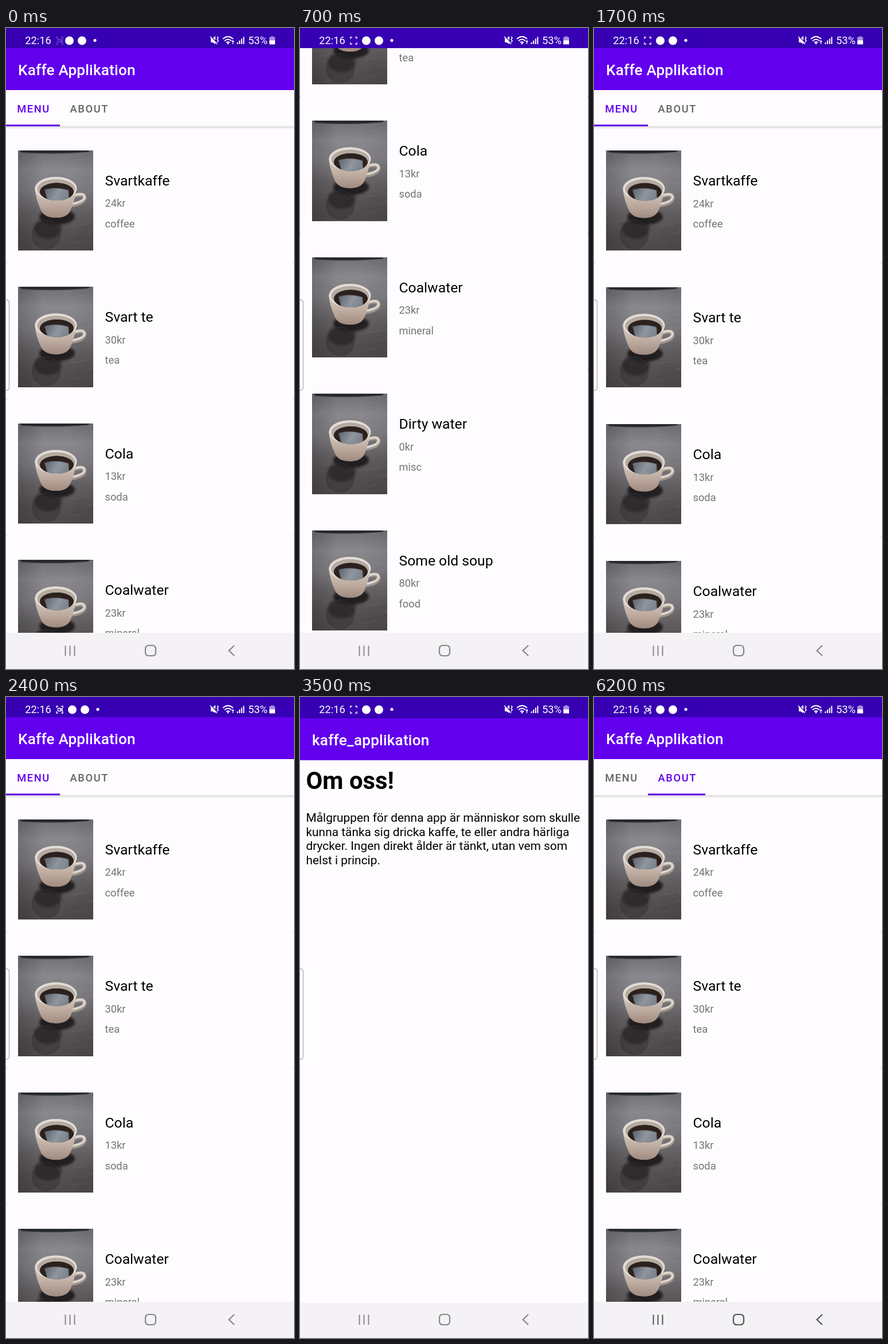
Recreate the animation shown at these times as an HTML page with a canvas. Size 502 by 1115 pixels, loop 6.4 s.

```html
<!DOCTYPE html>
<html lang="sv">
<head>
<meta charset="utf-8">
<style>
  html, body { margin: 0; width: 100%; height: 100%; overflow: hidden; background: #000; }
  canvas { display: block; width: 502px; height: 1115px; }
</style>
</head>
<body>
<canvas id="stage" width="502" height="1115"></canvas>
<script>
const W = 502, H = 1115, LOOP = 6400, STEP = 100;
const STATUS = 35, NAV = 1052, HEADER = 171, PITCH = 237.5;
const PURPLE = '#6200ee', DEEP = '#3700b3', PAPER = '#fefcff', NAV_BG = '#f4f2f5';
const MENU = [
  ['Svartkaffe', '24kr', 'coffee'],
  ['Svart te', '30kr', 'tea'],
  ['Cola', '13kr', 'soda'],
  ['Coalwater', '23kr', 'mineral'],
  ['Dirty water', '0kr', 'misc'],
  ['Some old soup', '80kr', 'food']
];
const ABOUT = [
  'Målgruppen för denna app är människor som skulle',
  'kunna tänka sig dricka kaffe, te eller andra härliga',
  'drycker. Ingen direkt ålder är tänkt, utan vem som',
  'helst i princip.'
];

const screen = document.getElementById('stage').getContext('2d');
const makeLayer = (w, h) => {
  const c = document.createElement('canvas');
  c.width = w;
  c.height = h;
  return c.getContext('2d');
};
const aboutLayer = makeLayer(W, H);

// Piecewise linear track: [time, value] pairs.
function track(t, ...keys) {
  if (t <= keys[0][0]) return keys[0][1];
  for (let i = 1; i < keys.length; i++) {
    const [t0, a] = keys[i - 1], [t1, b] = keys[i];
    if (t <= t1) return a + (b - a) * (t - t0) / (t1 - t0);
  }
  return keys[keys.length - 1][1];
}

function rect(g, color, x, y, w, h) {
  g.fillStyle = color;
  g.fillRect(x, y, w, h);
}

function ellipse(g, color, x, y, rx, ry, tilt = 0) {
  g.fillStyle = color;
  g.beginPath();
  g.ellipse(x, y, rx, ry, tilt, 0, 7);
  g.fill();
}

function text(g, str, x, y, size, color, weight = 400, spacing = 0) {
  g.font = `${weight} ${size}px Roboto, sans-serif`;
  g.letterSpacing = spacing + 'px';
  g.fillStyle = color;
  g.fillText(str, x, y);
}

function stroke(g, color, width, path) {
  g.strokeStyle = color;
  g.lineWidth = width;
  g.stroke(new Path2D(path));
}

function gradient(g, x0, y0, x1, y1, ...colors) {
  const fill = g.createLinearGradient(x0, y0, x1, y1);
  colors.forEach((c, i) => fill.addColorStop(i / (colors.length - 1), c));
  return fill;
}

// Cup on a dark table, built once at double size.
const photo = makeLayer(262, 350);
(function paintPhoto(g) {
  g.scale(2, 2);
  rect(g, gradient(g, 0, 0, 0, 175, '#717074', '#89888d', '#828085', '#686568', '#565254', '#4d494a'), 0, 0, 131, 175);
  rect(g, gradient(g, 0, 0, 131, 0, 'rgba(20,18,20,.2)', 'rgba(0,0,0,0)', 'rgba(0,0,0,0)', 'rgba(20,18,20,.08)'), 0, 0, 131, 175);

  let seed = 7;
  const random = () => (seed = seed * 16807 % 2147483647) / 2147483647;
  for (let i = 0; i < 90; i++) {
    const x = random() * 131, y = 15 + random() * 160;
    const tone = i % 2 ? '255,255,255' : '0,0,0';
    stroke(g, `rgba(${tone},.06)`, .7, `M${x} ${y}l${12 + random() * 25} ${-3 - random() * 5}`);
  }

  g.filter = 'blur(4px)';
  ellipse(g, 'rgba(28,25,27,.9)', 68, 116, 31, 14);
  ellipse(g, 'rgba(32,29,31,.65)', 52, 136, 24, 18);
  g.filter = 'blur(1px)';
  g.fillStyle = '#25282c';
  g.fill(new Path2D('M3 0H126L122 3Q65 8 6 4Z'));
  g.filter = 'none';
  ellipse(g, 'rgba(42,39,41,.35)', 49, 148, 26, 26);
  g.strokeStyle = 'rgba(150,143,140,.15)';
  g.lineWidth = 1;
  g.stroke();

  g.lineCap = 'round';
  stroke(g, '#a3978d', 7, 'M97 80Q115 74 116 83Q115 93 91 96');
  stroke(g, '#ddd6ce', 4, 'M98 79Q115 73 116 82Q115 90 92 94');
  g.fillStyle = gradient(g, 0, 76, 0, 118, '#cfc3b9', '#bca89c', '#a08b81');
  g.fill(new Path2D('M29 66Q31 86 40 105Q46 118 66 118Q85 118 91 106Q99 88 102 66Z'));
  ellipse(g, '#e2ddd6', 66, 67, 36.5, 20.5);
  ellipse(g, '#b5aaa0', 66.5, 68, 33, 17.5);
  ellipse(g, '#2b211e', 67.5, 72.5, 29.5, 15.5);
  g.save();
  g.clip();
  g.filter = 'blur(1px)';
  g.fillStyle = gradient(g, 45, 66, 90, 90, '#596069', '#8f969f', '#747b85');
  g.fill(new Path2D('M46 69Q66 63 88 70L89 87Q70 94 51 86Z'));
  g.restore();
})(photo);

function drawItem(g, [name, price, kind], top) {
  g.drawImage(photo.canvas, 21, top, 131, 174.5);
  text(g, name, 172.5, top + 61.3, 24.7, '#000');
  text(g, price, 172.5, top + 98.8, 18.3, '#757575');
  text(g, kind, 172.5, top + 134, 18.3, '#757575');
  rect(g, '#d5d3d6', 0, top + 195, 2, 1.5);
  rect(g, '#d5d3d6', 500, top + 195, 2, 1.5);
}

function drawHeader(g, t) {
  const shift = track(t, [2800, 0], [3100, 1]);
  const selected = t >= 2900;
  const tab = on => on ? PURPLE : '#666467';
  rect(g, gradient(g, 0, HEADER, 0, HEADER + 5, 'rgba(0,0,0,.15)', 'rgba(0,0,0,0)'), 0, HEADER, W, 5);
  rect(g, PURPLE, 0, STATUS, W, 73);
  text(g, 'Kaffe Applikation', 21, 82, 26.1, '#fff', 500, .2);
  rect(g, PAPER, 0, 108, W, 63);

  const radius = track(t, [2800, 0], [2900, 25], [3200, 59]);
  if (radius && t < 3800) {
    g.save();
    g.beginPath();
    g.rect(0, 108, W, 63);
    g.clip();
    ellipse(g, '#d6d4d7', 144, 140, radius, radius);
    g.restore();
  }
  text(g, 'MENU', 19.2, 147, 18.3, tab(!selected), 500, 1.6);
  text(g, 'ABOUT', 111.5, 147, 18.3, tab(selected), 500, 1.6);
  rect(g, PURPLE, 94 * shift, 168, 94 + 6 * shift, 3);
}

function drawMenuWindow(g, t) {
  const offset = t < 4500
    ? track(t, [3100, 0], [3200, -4], [3300, -9], [3400, -13])
    : track(t, [4900, -13], [5000, -11], [5200, -4], [5400, 0]);
  const scroll = track(t, [0, 0], [100, 40], [300, 230], [500, 430], [700, 526.5],
    [850, 543], [950, 543], [1100, 450], [1300, 180], [1500, 20], [1570, 0]);
  const stretch = track(t, [1500, 0], [1600, .004], [1700, .002], [2200, .001], [2400, 0]);

  g.save();
  g.translate(0, offset);
  rect(g, PAPER, 0, 0, W, H);
  g.save();
  g.translate(0, HEADER - scroll);
  g.scale(1, 1 + stretch);
  MENU.forEach((item, i) => drawItem(g, item, 41.5 + i * PITCH));
  g.restore();
  if (scroll < HEADER) {
    g.save();
    g.translate(0, -scroll);
    drawHeader(g, t);
    g.restore();
  }
  rect(g, DEEP, 0, 0, W, STATUS);
  rect(g, NAV_BG, 0, NAV, W, H - NAV);
  g.restore();
}

function drawAboutWindow(g, t) {
  const opening = t < 4500;
  const offset = opening
    ? track(t, [3100, 270], [3200, 187], [3300, 70], [3400, 17], [3500, 2], [3600, 1], [3700, 0])
    : track(t, [4800, 0], [4900, 10], [5000, 49], [5100, 140], [5200, 230], [5300, 280]);
  const alpha = opening
    ? track(t, [3100, 0], [3200, .4], [3300, 1])
    : track(t, [5000, 1], [5100, .65], [5200, .25], [5300, 0]);
  if (!alpha) return;

  const a = aboutLayer;
  rect(a, PAPER, 0, 0, W, H);
  rect(a, DEEP, 0, 0, W, STATUS);
  rect(a, PURPLE, 0, STATUS, W, 73);
  text(a, 'kaffe_applikation', 21, 81.5, 26.1, '#fff', 500, .2);
  if (t >= 3400) {
    text(a, 'Om oss!', 10.5, 158, 41.8, '#000', 700);
    ABOUT.forEach((line, i) => text(a, line, 10.5, 215 + i * 24.6, 20.9, '#000'));
  }
  rect(a, NAV_BG, 0, NAV, W, H - NAV);

  g.globalAlpha = alpha;
  g.drawImage(a.canvas, 0, Math.round(offset));
  g.globalAlpha = 1;
}

function drawRecorder(g, t) {
  const camera = t < 100 || (t >= 2300 && t < 3400) || t >= 4300;
  g.globalAlpha = t < 100 ? .28 : 1;
  stroke(g, '#fff', 1.4, 'M91 16H88V19M96 16H99V19M91 28H88V25M96 28H99V25');
  if (camera) stroke(g, '#fff', 1.4, 'M90.5 19.5H95V24.5H90.5ZM95 22L98 20V24.5L95 22.5');
  g.globalAlpha = 1;
}

function drawStatusIcons(g, t) {
  const slide = t < 100 ? -5 : 0;
  g.lineCap = 'butt';
  text(g, '22:16', 33.2, 28, 18.3, '#fff');
  drawRecorder(g, t);
  ellipse(g, '#fff', 115.5 + slide, 22, 7.5, 7.5);
  ellipse(g, '#fff', 137.5 + slide, 22, 7.5, 7.5);
  ellipse(g, '#fff', 160 + slide, 21.5, 2.6, 2.6);

  g.fillStyle = '#fff';
  g.fill(new Path2D('M357 18H360L365 14V28L360 25H357Z'));
  stroke(g, DEEP, 1.4, 'M357 14L370 28');
  stroke(g, '#fff', 1.5, 'M356 15L368 28M368 15L370 17L368 20L370 22L368 25');

  stroke(g, '#fff', 1.8, 'M378 19Q387 11 396 19M381 22.5Q387 17 393 22.5M384 25.5Q387 23 390 25.5');
  ellipse(g, '#fff', 387, 27, 1.5, 1.5);
  stroke(g, '#fff', 1.3, 'M395.5 28V22M393.8 24L395.5 22L397.2 24');
  for (let i = 0; i < 4; i++) rect(g, '#fff', 402.5 + i * 3.6, 25 - i * 3.2, 2, 3 + i * 3.2);

  text(g, '53%', 422, 28, 18.3, '#fff');
  rect(g, '#a78ede', 461.5, 14.5, 5, 2);
  rect(g, '#a78ede', 459, 16, 10, 6);
  rect(g, '#fff', 459, 21.5, 10, 7);
}

function drawNavIcons(g, t) {
  const press = track(t, [4700, 0], [4800, .6], [4900, 1], [5100, 1], [5400, 0]);
  if (press) {
    g.fillStyle = `rgba(0,0,0,${.06 * press})`;
    g.beginPath();
    g.roundRect(317, NAV, 149, 63, 31.5);
    g.fill();
  }
  const color = t >= 4800 ? '#555457' : '#89878a';
  stroke(g, color, 2, 'M103.5 1074.5V1092M111.5 1074.5V1092M119.5 1074.5V1092');
  stroke(g, color, 2.2, 'M398 1074L388.5 1083L398 1092');
  g.beginPath();
  g.roundRect(243, 1074, 18, 18, 5.5);
  g.stroke();
}

function drawEdgeHandle(g) {
  g.beginPath();
  g.roundRect(-8, 472.5, 13.5, 158, 5);
  g.fillStyle = PAPER;
  g.fill();
  g.strokeStyle = '#b0aeb1';
  g.lineWidth = 1.3;
  g.stroke();
}

function render(t) {
  rect(screen, '#000', 0, 0, W, H);
  drawMenuWindow(screen, t);
  drawAboutWindow(screen, t);
  drawStatusIcons(screen, t);
  drawNavIcons(screen, t);
  drawEdgeHandle(screen);
}

function frame() {
  const t = performance.now() % LOOP;
  render(Math.floor(t / STEP) * STEP);
  requestAnimationFrame(frame);
}
frame();
</script>
</body>
</html>
```
